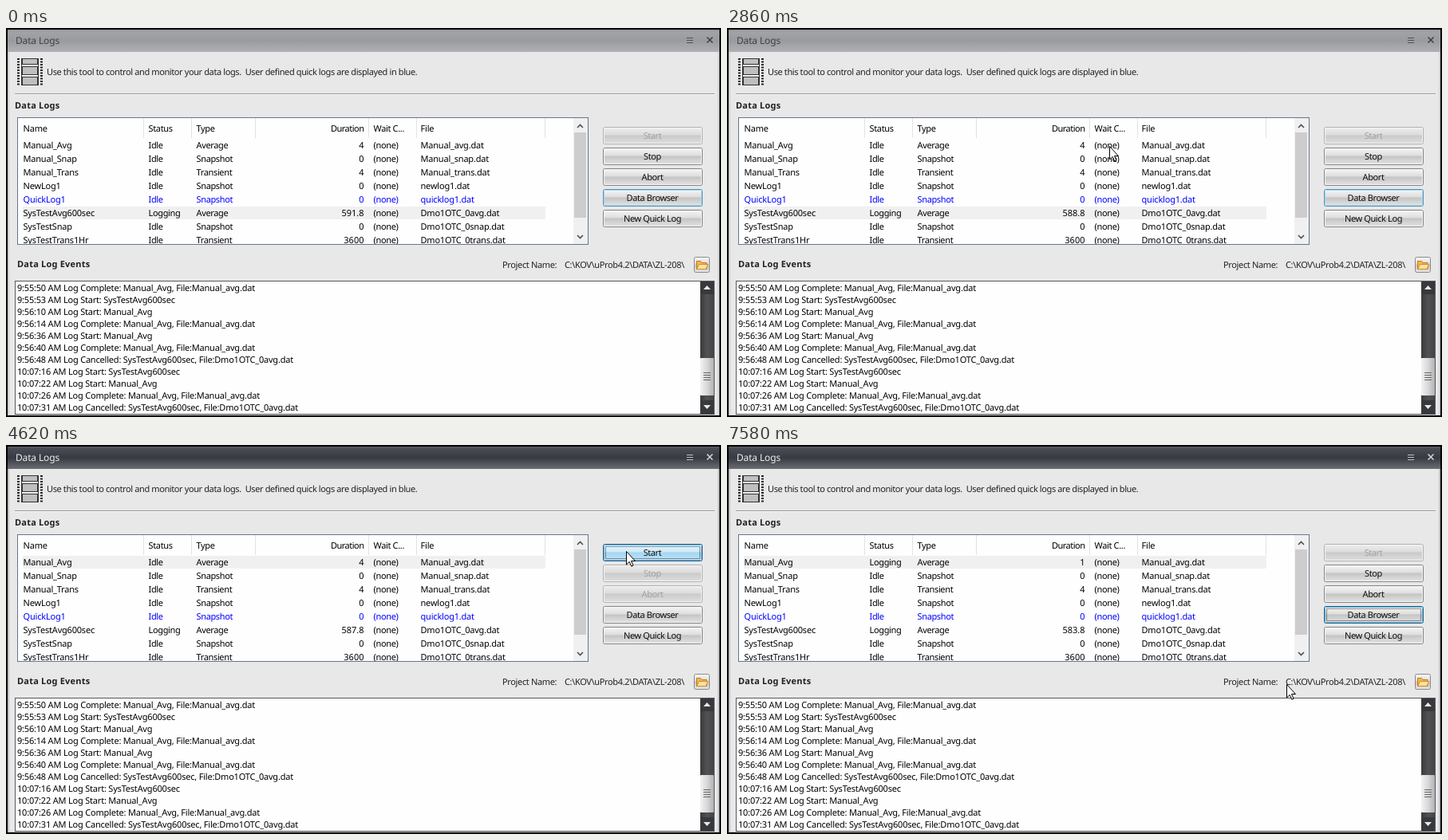
An HTML page for the animation above (8000 ms loop, 896x488 px).

```html
<!DOCTYPE html>
<html lang="en">
<head>
<meta charset="utf-8">
<title>Data Logs</title>
<style>
html, body { margin: 0; width: 100%; height: 100%; overflow: hidden; background: #000; }
svg { display: block; width: 896px; height: 488px; }
text { font: 11px "Noto Sans", "Open Sans", sans-serif; letter-spacing: -.35px; white-space: pre; text-rendering: geometricPrecision; }
.title { font-size: 12px; letter-spacing: -.15px; }
.heading { font-weight: 700; letter-spacing: .2px; fill: #222; }
.number { text-anchor: end; letter-spacing: 0; }
.name, .event { letter-spacing: -.2px; }
.button text { text-anchor: middle; letter-spacing: -.4px; }
</style>
</head>
<body>
<svg id="stage" viewBox="0 0 896 488"></svg>
<script>
const LOOP = 8000;
const ACTIVATE = 3030, SELECT = 3060, PRESS = 4340, RUN = 4650;
const SYSTEM_TICKS = [620, 1620, 2600, 3600, RUN, 5510, 6550, 7580];
const MANUAL_TICKS = [5510, 6550, 7580];

const columns = [21.5, 178.5, 238.5, 448.5, 460.5, 519.5];
const columnClasses = ['name', '', '', 'number', '', 'name'];
const rows = [
  ['Manual_Avg', 'Idle', 'Average', '4', 'Manual_avg'],
  ['Manual_Snap', 'Idle', 'Snapshot', '0', 'Manual_snap'],
  ['Manual_Trans', 'Idle', 'Transient', '4', 'Manual_trans'],
  ['NewLog1', 'Idle', 'Snapshot', '0', 'newlog1'],
  ['QuickLog1', 'Idle', 'Snapshot', '0', 'quicklog1'],
  ['SysTestAvg600sec', 'Logging', 'Average', '591.8', 'Dmo1OTC_0avg'],
  ['SysTestSnap', 'Idle', 'Snapshot', '0', 'Dmo1OTC_0snap'],
  ['SysTestTrans1Hr', 'Idle', 'Transient', '3600', 'Dmo1OTC_0trans']
];
const manualDone = 'Log Complete: Manual_Avg, File:Manual_avg.dat';
const manualStart = 'Log Start: Manual_Avg';
const systemStart = 'Log Start: SysTestAvg600sec';
const systemStop = 'Log Cancelled: SysTestAvg600sec, File:Dmo1OTC_0avg.dat';
const events = [
  ['9:55:50', manualDone], ['9:55:53', systemStart], ['9:56:10', manualStart],
  ['9:56:14', manualDone], ['9:56:36', manualStart], ['9:56:40', manualDone],
  ['9:56:48', systemStop], ['10:07:16', systemStart], ['10:07:22', manualStart],
  ['10:07:26', manualDone], ['10:07:31', systemStop]
];
const buttons = ['Start', 'Stop', 'Abort', 'Data Browser', 'New Quick Log'];

// Shape helpers
const rect = (x, y, w, h, fill, more = '') =>
  `<rect x="${x}" y="${y}" width="${w}" height="${h}" fill="${fill}" ${more}/>`;
const text = (x, y, s, cls = '', more = '') =>
  `<text x="${x}" y="${y}" class="${cls}" ${more}>${s}</text>`;
const line = (d, stroke, width = 1, more = '') =>
  `<path d="${d}" fill="none" stroke="${stroke}" stroke-width="${width}" ${more}/>`;
const shape = (d, fill, more = '') => `<path d="${d}" fill="${fill}" ${more}/>`;
const gradient = (id, stops, across = false) =>
  `<linearGradient id="${id}" x2="${+across}" y2="${+!across}">` +
  stops.map(([at, color]) => `<stop offset="${at}" stop-color="${color}"/>`).join('') +
  '</linearGradient>';

const defs = `<defs>
  ${gradient('titleOff', [[0, '#929396'], [.1, '#a2a3a6'], [.5, '#9a9b9e'], [1, '#b0b1b4']])}
  ${gradient('titleOn', [[0, '#5c5f66'], [.1, '#484b53'], [.5, '#383a41'], [1, '#6a6d74']])}
  ${gradient('normal', [[0, '#f6f6f6'], [.45, '#dedede'], [.5, '#c4c4c4'], [1, '#e4e4e4']])}
  ${gradient('off', [[0, '#eeeeee'], [.45, '#dcdcdc'], [.5, '#cacaca'], [1, '#dfdfdf']])}
  ${gradient('hot', [[0, '#e9f6fd'], [.45, '#cde9f9'], [.5, '#a5d5f1'], [1, '#c2e5f8']])}
  ${gradient('thumb', [[0, '#f2f2f2'], [.5, '#d8d8d8'], [1, '#b2b2b2']], true)}
  ${gradient('track', [[0, '#3a3a3c'], [.5, '#525254'], [1, '#444446']], true)}
  <clipPath id="list">${rect(15, 113, 696, 158, '#fff')}</clipPath>
</defs>`;

const titleBar = rect(2, 2, 892, 484, '#d0d0d2', 'id="frame"') +
  rect(2, 2, 892, 28, 'url(#titleOff)', 'id="titleBar"') +
  text(12, 20, 'Data Logs', 'title', 'id="title"') +
  line('M853 12.5h8M853 15.5h8M853 18.5h8', '#444', 1, 'id="menu"') +
  line('M878.5 11.5l7 7m0-7l-7 7', '#444', 1.5, 'id="close"') +
  rect(4, 30, 888, 455, '#e8e8e9');

const filmIcon = rect(14, 38, 32, 34, '#f4f4f4') +
  line('M15.5 38v34M44.5 38v34', '#222', 3, 'stroke-dasharray="2 1.5"') +
  line('M19.5 38v34M40.5 38v34', '#333') +
  [[38.5, 7], [48.5, 10], [61.5, 10]].map(([y, h]) => rect(20.5, y, 19, h, '#bfbfbf', 'stroke="#333"')).join('');

const intro = filmIcon +
  text(51, 59, 'Use this tool to control and monitor your data logs.  User defined quick logs are displayed in blue.', '',
    'style="letter-spacing:-.39px" fill="#222"') +
  line('M11 82.5h877', '#9a9a9a') + line('M11 83.5h877', '#f8f8f8') +
  text(11, 101, 'Data Logs', 'heading');

function tableRow([name, status, type, duration, file], i) {
  const cells = [name, status, type, duration, '(none)', file + '.dat'];
  return `<g id="row${i}" fill="${i === 4 ? '#00f' : '#000'}">` +
    cells.map((s, c) => text(columns[c], 151 + 17 * i, s, columnClasses[c], `id="cell${i}-${c}"`)).join('') + '</g>';
}

const table = rect(14.5, 112.5, 715, 159, '#fefefe', 'stroke="#66758c"') +
  line([172, 232, 312, 454, 514, 675].map(x => `M${x}.5 113v25`).join(''), '#e2e2e2') +
  ['Name', 'Status', 'Type', 'Duration', 'Wait C...', 'File'].map((s, c) =>
    text(columns[c], 130, s, columnClasses[c], c === 3 ? 'style="letter-spacing:-.5px"' : '')).join('') +
  `<g clip-path="url(#list)">${rect(21, 139, 655, 16, '#f0f0f0', 'id="highlight"')}${rows.map(tableRow).join('')}</g>` +
  rect(711, 113, 18, 158, '#f0f0f0') + rect(712, 131, 15, 107, '#cdcdcd') +
  line('M716 125l3.5-3.5 3.5 3.5M716 260l3.5 3.5 3.5-3.5', '#505050', 1.6);

const buttonColumn = buttons.map((label, i) => {
  const y = 124 + 26 * i;
  return `<g id="button${i}" class="button">` +
    rect(748.5, y + .5, 124, 21, 'url(#normal)', 'rx="2" stroke="#8a8a8a"') +
    rect(749.5, y + 1.5, 122, 19, 'none', 'rx="1"') +
    rect(751.5, y + 3.5, 118, 15, 'none', 'stroke-dasharray="1 1"') +
    text(810, y + 15, label) + '</g>';
}).join('');

const project = text(14, 300, 'Data Log Events', 'heading') +
  text(622, 301, 'Project Name:', '', 'fill="#222"') +
  text(700, 301, 'C:\\KOV\\uProb4.2\\DATA\\ZL-208\\', '', 'fill="#222"') +
  rect(862.5, 287.5, 19, 19, 'url(#normal)', 'rx="2" stroke="#8a8a8a"') +
  shape('M865.5 302.5v-10h5l1.5 2h6v8z', '#f5b74c', 'stroke="#c27a1c"') +
  shape('M865.5 302.5l3-6h11l-2.5 6z', '#ffe1a0', 'stroke="#d08a25"');

const eventList = rect(11.5, 317.5, 876, 167, '#fefefe', 'stroke="#55585e"') +
  events.map(([time, s], i) => text(14, 330 + 15 * i, `${time} AM ${s}`, 'event')).join('') +
  rect(870, 318, 17, 166, 'url(#track)') +
  rect(870, 318, 17, 16, '#38393c') + rect(870, 467, 17, 17, '#38393c') +
  shape('M874 328l4.5-5 4.5 5zM874 473l4.5 5 4.5-5z', '#e8e8e8') +
  `<g id="thumb">${rect(870, 414, 17, 47, 'url(#thumb)', 'rx="1"')}` +
  line('M874 432.5h9M874 435.5h9M874 438.5h9M874 441.5h9', '#666') + '</g>';

const pointer = shape('M.5 .5V17L4.2 13.4 6.8 19.2 9 18.2 6.5 12.5H11.5Z', '#fff', 'id="pointer" stroke="#000"');

document.getElementById('stage').innerHTML =
  defs + titleBar + intro + table + buttonColumn + project + eventList + pointer;

const get = id => document.getElementById(id);
const setAll = (node, attrs) => Object.entries(attrs).forEach(([key, value]) => node.setAttribute(key, value));
const set = (id, attrs) => setAll(get(id), attrs);
const countPast = (ticks, t) => ticks.filter(tick => t >= tick).length;

// Pointer journeys: begin, end, from, to
const moves = [
  [2000, 2860, [668, 482], [479, 148]],
  [3580, 4300, [479, 148], [777, 133]],
  [RUN, 5000, [777, 133], [701, 300]]
];

function pointerAt(t) {
  const move = moves.filter(([begin]) => t >= begin).pop();
  if (!move) return null;
  const [begin, end, from, to] = move;
  const p = Math.min(1, (t - begin) / (end - begin));
  const eased = p * p * (3 - 2 * p);
  return from.map((v, i) => Math.round(v + (to[i] - v) * eased));
}

function focusedButton(t) {
  if (t < SELECT || t >= RUN) return 3;
  return t >= PRESS ? 0 : -1;
}

function drawButton(i, t, at) {
  const ready = t >= SELECT && t < RUN;
  const enabled = i > 2 || (i === 0) === ready;
  const top = 124 + 26 * i;
  const hot = enabled && at && at[0] >= 748 && at[0] < 873 && at[1] >= top && at[1] < top + 22;
  const focused = focusedButton(t) === i;
  const strong = focused && t >= PRESS;
  const [face, ring, dots, label] = get('button' + i).children;
  setAll(face, {
    fill: `url(#${hot ? 'hot' : enabled ? 'normal' : 'off'})`,
    stroke: strong ? '#2c628b' : hot ? '#3c7fb1' : focused ? '#4d94bb' : enabled ? '#858585' : '#b0b0b0'
  });
  ring.setAttribute('stroke', strong ? '#62b2dc' : focused ? '#a9d8ee' : '#f4f4f4');
  dots.setAttribute('stroke', strong ? '#333' : 'none');
  label.setAttribute('fill', enabled ? '#111' : '#a2a2a2');
}

function render(t) {
  const active = t >= ACTIVATE;
  const selected = t >= SELECT && t < PRESS;
  const running = t >= RUN;
  set('frame', { fill: active ? '#c0c1c4' : '#d0d0d2' });
  set('titleBar', { fill: active ? 'url(#titleOn)' : 'url(#titleOff)' });
  set('title', { fill: active ? '#f0f0f0' : '#404144' });
  set('menu', { stroke: active ? '#c0c0c0' : '#505154' });
  set('close', { stroke: active ? '#d8d8d8' : '#404144' });

  set('highlight', { y: t < SELECT ? 224 : 139, fill: selected ? '#0078d7' : '#f0f0f0' });
  set('row0', { fill: selected ? '#fff' : '#000' });
  get('cell0-1').textContent = running ? 'Logging' : 'Idle';
  get('cell0-3').textContent = 4 - countPast(MANUAL_TICKS, t);
  get('cell5-3').textContent = (591.8 - countPast(SYSTEM_TICKS, t)).toFixed(1);

  const at = pointerAt(t);
  buttons.forEach((_, i) => drawButton(i, t, at));
  set('thumb', { transform: `translate(0 ${running ? -4 : 0})` });
  set('pointer', { visibility: at ? 'visible' : 'hidden', transform: `translate(${at || [0, 0]})` });
}

const start = performance.now();
function tick() {
  render((performance.now() - start) % LOOP);
  requestAnimationFrame(tick);
}
tick();
</script>
</body>
</html>
```
